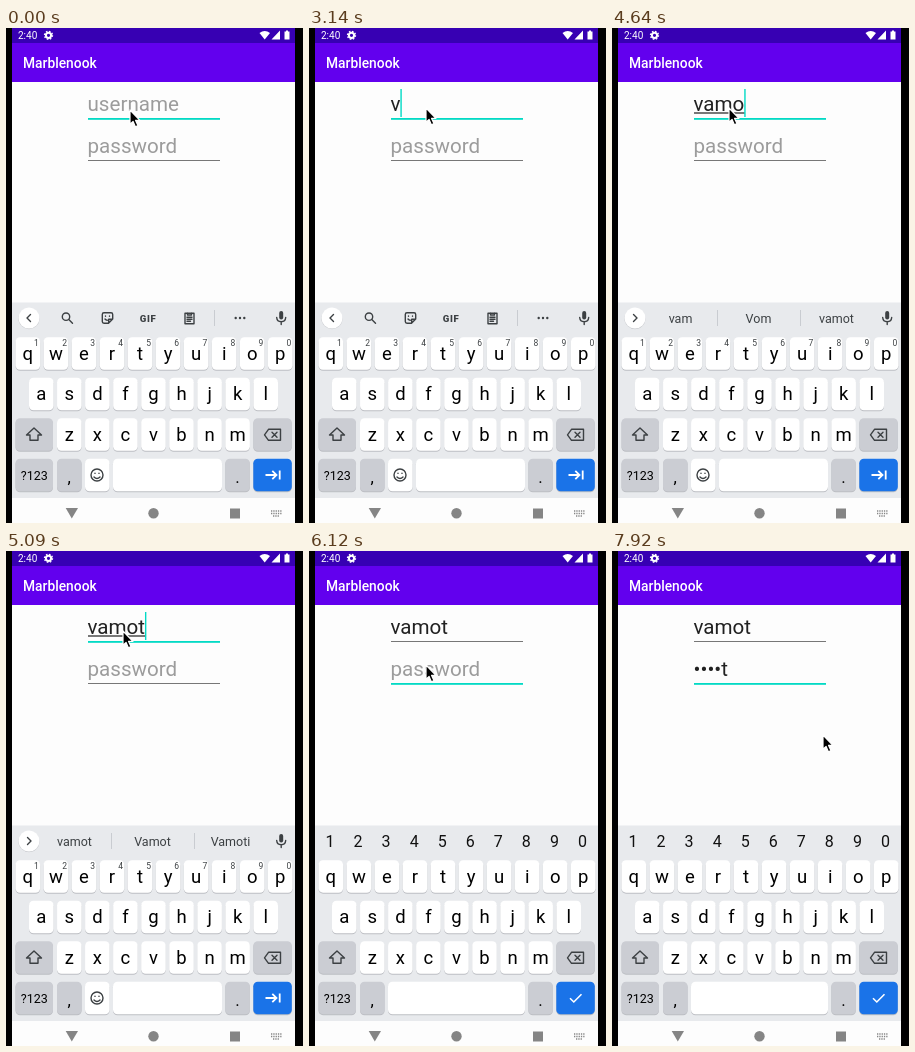
Animation, 297 px wide and 495 px high, one loop 8000 ms. Source, as an HTML page:

```html
<!DOCTYPE html>
<html lang="en">
<head>
<meta charset="utf-8">
<title>Login screen</title>
<style>
  html, body { margin: 0; width: 100%; height: 100%; overflow: hidden; background: #000; }
  svg { display: block; width: 297px; height: 495px; font-family: Roboto, sans-serif; }
  .mid { text-anchor: middle; }
  .icon { fill: none; stroke: #3c4043; stroke-width: 1.4; stroke-linecap: round; stroke-linejoin: round; }
  .field { font-size: 20.6px; }
  .word { font-size: 12.5px; fill: #3c4043; }
</style>
</head>
<body>
<svg viewBox="0 0 297 495">
  <rect width="297" height="495" fill="#000"/>
  <rect x="6" width="283" height="495" fill="#fdfdfd"/>
  <rect x="6" width="283" height="15" fill="#3700b3"/>
  <rect x="6" y="15" width="283" height="39" fill="#6200ee"/>
  <rect x="6" y="274.5" width="283" height="195.5" fill="#e8eaed"/>

  <g fill="#fff">
    <text x="12" y="11" font-size="10">2:40</text>
    <circle cx="42.5" cy="7.3" r="2.6" fill="none" stroke="#fff" stroke-width="2"/>
    <circle cx="42.5" cy="7.3" r="4" fill="none" stroke="#fff" stroke-width="1.3" stroke-dasharray="1.6 1.54"/>
    <path d="M253.5 5Q258.7 1 264 5L258.7 11.5ZM274 2.5V11.5H265.5ZM278.5 3.5H280V2.5H282V3.5H283.5V11.5H278.5Z"/>
    <text x="17" y="40" font-size="13.8" font-weight="500">Marblenook</text>
  </g>

  <text id="user" class="field" x="81.5" y="83"></text>
  <text id="pass" class="field" x="81.5" y="125"></text>
  <rect id="userLine" x="82" width="132"/>
  <rect id="passLine" x="82" width="132"/>
  <rect id="composing" x="82" y="84.4" height="1.2" fill="#212121"/>
  <rect id="caret" width="1.4" height="28" fill="#03dac5"/>

  <g id="keys"></g>
  <g id="plainBar"></g>
  <g id="secretBar"></g>
  <g id="hints" class="mid" font-size="8.5" fill="#3c4043"></g>
  <g id="digits" class="mid" font-size="16" fill="#111"></g>

  <g class="icon">
    <path d="M28 400L35.5 407H32V412.3H24V407H20.5Z"/>
    <path d="M262.5 401.3H274.5V412.3H262.5L258.5 406.8ZM266 404.3L271 409.3M271 404.3L266 409.3"/>
  </g>
  <g id="emoji" class="icon">
    <circle cx="91" cy="447" r="6"/>
    <path d="M88 449Q91 452 94 449M89 445.2V445.4M93 445.2V445.4"/>
  </g>
  <path id="next" d="M259.5 447H270.5M266.3 442.8L270.5 447L266.3 451.2M273.7 442.5V451.5" fill="none" stroke="#fff" stroke-width="1.8"/>
  <path id="done" d="M261 447.3L264.8 451L272.5 443.3" fill="none" stroke="#fff" stroke-width="1.6"/>

  <g id="strip">
    <circle cx="23" cy="290.6" r="10.6" fill="#c8cace"/>
    <circle cx="23" cy="290" r="10.5" fill="#fff"/>
    <path id="chevron" class="icon"/>
    <g class="icon">
      <rect x="273.2" y="283" width="4" height="8.5" rx="2" fill="#3c4043" stroke="none"/>
      <path d="M270.7 289.5Q271 293.7 275.2 293.7T279.7 289.5M275.2 294V296.5"/>
    </g>
  </g>
  <g id="tools">
    <g class="icon">
      <circle cx="60" cy="288.7" r="3.7"/><path d="M62.8 291.5L66.5 295.2"/>
      <path d="M98 284.7H105Q106.7 284.7 106.7 286.4V291L102.5 295.3H98Q96.3 295.3 96.3 293.6V286.4Q96.3 284.7 98 284.7ZM102.7 295V291.2H106.5M99.5 288V288.2M103.5 288V288.2M99 291Q100 292.3 101.3 292.2"/>
      <path d="M179 285.3H188V295.7H179ZM181.5 285V287H185.5V285M181 289.3H186M181 291.3H186M181 293.3H184.5"/>
    </g>
    <text class="mid" x="142" y="293.6" font-size="9.6" font-weight="900" letter-spacing=".6" fill="#3c4043">GIF</text>
    <path d="M208.5 282V298" stroke="#c9ccd1"/>
    <path d="M229.7 290H239" stroke="#3c4043" stroke-width="2.4" stroke-linecap="round" stroke-dasharray="0 4.3"/>
  </g>
  <g id="words">
    <path d="M105.5 282V298M188.5 282V298" stroke="#c9ccd1"/>
    <text class="mid word" x="68.5" y="295"></text>
    <text class="mid word" x="146.5" y="295"></text>
    <text class="mid word" x="224.5" y="295"></text>
  </g>

  <g fill="#858585">
    <path d="M59.7 480H72L65.8 490.5Z"/>
    <circle cx="147.5" cy="485.3" r="5.2"/>
    <rect x="224" y="480.5" width="10" height="10"/>
    <path d="M265 483H275.5M265 485.5H275.5M267 488H273.5" fill="none" stroke="#858585" stroke-width="1.3" stroke-dasharray="1.3 1"/>
  </g>

  <path id="pointer" d="M.5 1.5V15.8L3.6 12.9L5.9 18.2L8.4 17.1L6.1 11.9H10.4Z" fill="#000" stroke="#fff" stroke-width="1.2" stroke-linejoin="round"/>
</svg>
<script>
const $ = id => document.getElementById(id);
const TEAL = '#03dac5', GREY = '#cbcdd3', WHITE = '#fff';

function add(parent, tag, attrs, text = '') {
  const node = document.createElementNS('http://www.w3.org/2000/svg', tag);
  for (const name in attrs) node.setAttribute(name, attrs[name]);
  node.textContent = text;
  parent.appendChild(node);
}

function key(x, y, width, fill, { label = '', size = 18.5, baseline = 22.3, group = 'keys' } = {}) {
  const shape = { x, width, height: 32.5, rx: 4.5 };
  add($(group), 'rect', { ...shape, y: y + 1, fill: '#bcbec3' });
  add($(group), 'rect', { ...shape, y, fill });
  add($(group), 'text', { class: 'mid', x: x + width / 2, y: y + baseline, 'font-size': size }, label);
}

[['qwertyuiop', 9.5], ['asdfghjkl', 23], ['zxcvbnm', 51]].forEach(([row, x], line) =>
  [...row].forEach((label, i) => key(x + i * 28.05, 309.2 + line * 40.5, 24.6, WHITE, { label })));
[...'1234567890'].forEach((digit, i) => {
  add($('hints'), 'text', { x: 30.5 + i * 28.05, y: 317.7 }, digit);
  add($('digits'), 'text', { x: 21 + i * 28.05, y: 296.3 }, digit);
});
key(9.5, 390.2, 37.5, GREY);
key(247.3, 390.2, 38.5, GREY);
key(9.5, 430.7, 37.5, GREY, { label: '?123', size: 12.5, baseline: 21 });
key(51, 430.7, 24.6, GREY, { label: ',', size: 17, baseline: 24 });
key(219.3, 430.7, 24.6, GREY, { label: '.', size: 17, baseline: 24 });
key(247.3, 430.7, 38.5, '#1a73e8');
key(79, 430.7, 24.6, WHITE, { group: 'plainBar' });
key(107, 430.7, 109, WHITE, { group: 'plainBar' });
key(79, 430.7, 137, WHITE, { group: 'secretBar' });

const start = {
  user: '', pass: '', focus: 'user', pressed: '', caret: false,
  composing: false, words: null, pointer: [123.5, 80.5]
};
// Each step changes part of the state at its time in ms.
const steps = [
  [0, {}],
  [300, { caret: true }],
  [900, { caret: false }],
  [1350, { caret: true }],
  [1790, { caret: false }],
  [1940, { pressed: 'user' }],
  [2090, { pressed: '' }],
  [2390, { caret: true, pointer: [119, 79.5] }],
  [2540, { pointer: [116.5, 78.5] }],
  [2840, { caret: false }],
  [3140, { user: 'v', caret: true }],
  [3440, { composing: true, words: ['v', 'V', 'va'] }],
  [3890, { user: 'va' }],
  [4040, { words: ['va', 'Van', 'vamot'] }],
  [4340, { user: 'vam' }],
  [4490, { words: ['vam', 'Vom', 'vamot'] }],
  [4640, { user: 'vamo' }],
  [4790, { words: ['vamo', 'Vamo', 'vamot'] }],
  [4940, { user: 'vamot' }],
  [5090, { words: ['vamot', 'Vamot', 'Vamoti'] }],
  [5240, { pointer: [116.5, 96] }],
  [5380, { pointer: [116.5, 112.5], caret: false }],
  [5530, { focus: 'both', pressed: 'pass' }],
  [5680, { focus: 'pass', pressed: '', caret: true, composing: false }],
  [6120, { caret: false }],
  [6570, { pass: 'v', caret: true }],
  [6870, { pass: '•a' }],
  [7020, { pass: '••m' }],
  [7170, { pass: '•••o' }],
  [7470, { pass: '••••t' }],
  [7920, { caret: false, pointer: [210.5, 182.5] }]
];
let previous = start;
const states = steps.map(([, change]) => previous = { ...previous, ...change });

const show = (visible, ...ids) => ids.forEach(id => $(id).style.display = visible ? '' : 'none');
const set = (id, attrs) => Object.entries(attrs).forEach(([name, value]) => $(id).setAttribute(name, value));

function drawField(id, hint, lineY, state) {
  const active = state.focus === id || state.focus === 'both';
  $(id).textContent = state[id] || hint;
  set(id, { fill: state[id] ? '#212121' : state.pressed === id ? '#6e6e6e' : '#9c9c9c' });
  set(id + 'Line', active
    ? { y: lineY, height: 1.8, fill: TEAL }
    : { y: lineY, height: 1, fill: '#777' });
}

function draw(state) {
  const secret = state.focus === 'pass';
  drawField('user', 'username', 90, state);
  drawField('pass', 'password', 132, state);

  const field = secret ? 'pass' : 'user';
  const typed = state[field] ? $(field).getComputedTextLength() : 0;
  show(state.caret, 'caret');
  set('caret', { x: 81.4 + typed, y: secret ? 103 : 61 });
  show(state.composing, 'composing');
  set('composing', { width: typed });

  show(!secret, 'strip', 'hints', 'emoji', 'next', 'plainBar');
  show(secret, 'digits', 'done', 'secretBar');
  show(!secret && !state.words, 'tools');
  show(!secret && state.words, 'words');
  if (state.words) document.querySelectorAll('.word').forEach((node, i) => node.textContent = state.words[i]);
  set('chevron', { d: state.words ? 'M21.5 286.5L25 290L21.5 293.5' : 'M24.5 286.5L21 290L24.5 293.5' });
  set('pointer', { transform: `translate(${state.pointer})` });
}

let shown = -1;
function tick() {
  const time = performance.now() % 8000;
  const index = steps.filter(([at]) => at <= time).length - 1;
  if (index !== shown) draw(states[shown = index]);
  requestAnimationFrame(tick);
}
tick();
</script>
</body>
</html>
```
